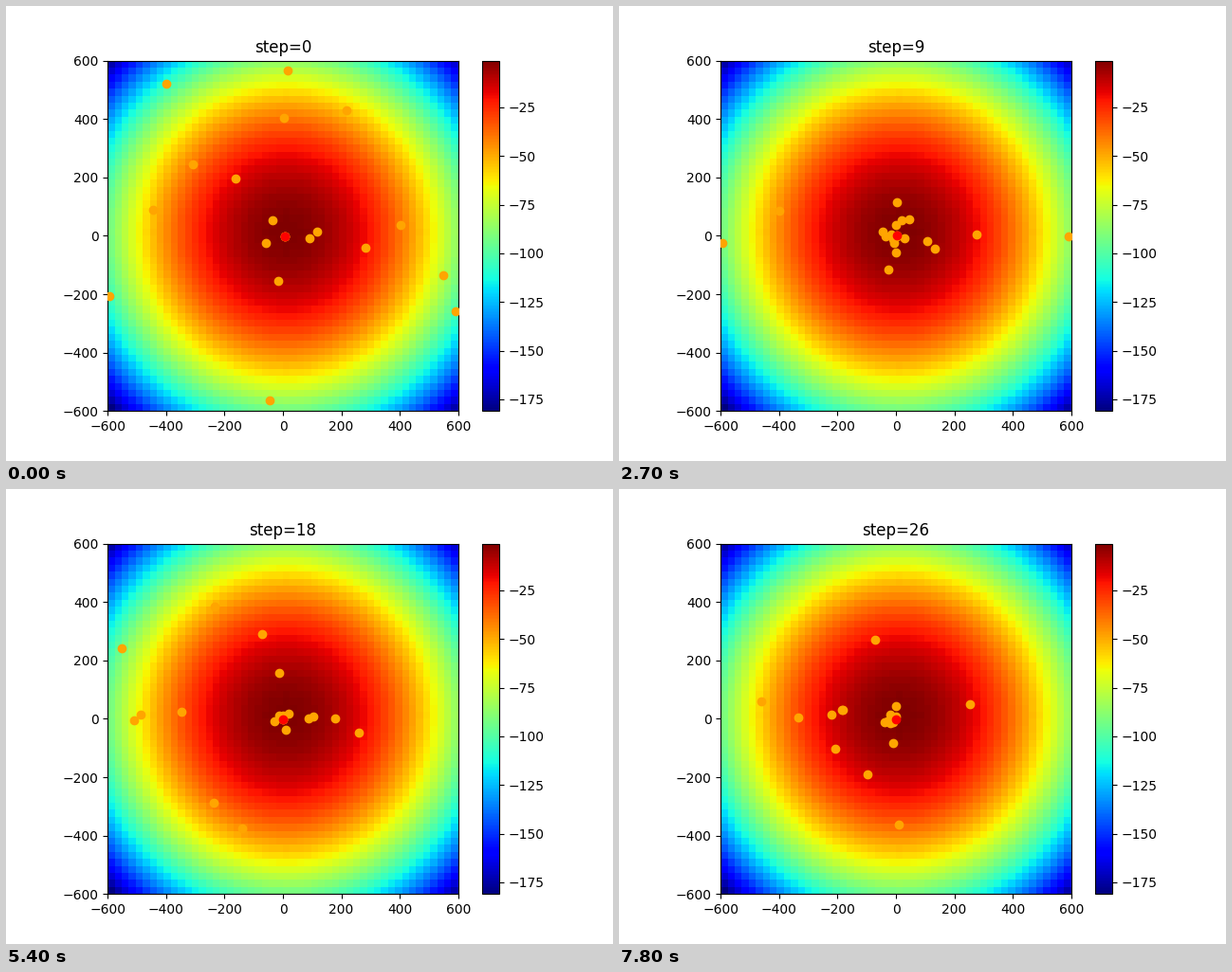
Animation, 640 px wide and 480 px high, one loop 8 s. Source, as a matplotlib script:

```python
import matplotlib.pyplot as plt
import numpy as np
from matplotlib.animation import FuncAnimation

LIMIT = 600
STEPS = 27
STEP_FRAMES = 3
FRAMES = 80

START = [(-398, 522), (16, 566), (3, 403), (216, 430), (-310, 244),
         (-162, 195), (-36, 53), (-58, -26), (117, 13), (91, -10),
         (-16, -155), (283, -42), (403, 36), (549, -136), (591, -260),
         (-594, -205), (-47, -564), (-445, 89), (5, -2), (6, -3)]


def cost(x, y):
    return 1 + (x**2 + y**2) / 4000


def run_colony(seed=7):
    """Artificial bee colony: greedy moves along one axis, then scouting."""
    rng = np.random.default_rng(seed)
    bees = np.array(START, float)
    count = len(bees)
    scout_step = rng.integers(13, 21, count)
    best = min(bees, key=lambda bee: cost(*bee)).copy()
    history = [(bees.copy(), best.copy())]
    for step in range(1, STEPS):
        for i in range(count):
            if step == scout_step[i]:
                bees[i] = rng.uniform((-580, -520), (540, 420))
                continue
            axis = rng.integers(2)
            partner = (i + rng.integers(1, count)) % count
            trial = bees[i].copy()
            trial[axis] += rng.uniform(-1, 1) * (trial - bees[partner])[axis]
            if cost(*trial) < cost(*bees[i]):
                bees[i] = trial
            if cost(*bees[i]) < cost(*best):
                best = bees[i].copy()
        history.append((bees.copy(), best.copy()))
    return history


history = run_colony()

fig = plt.figure(figsize=(6.4, 4.8), dpi=100)
ax = fig.add_subplot()
ax.set_aspect("equal")
edges = np.linspace(-LIMIT, LIMIT, 51)
gx, gy = np.meshgrid(edges, edges)
# Each cell takes the value of its lower left corner.
mesh = ax.pcolormesh(gx, gy, -cost(gx, gy)[:-1, :-1], cmap="jet")
fig.colorbar(mesh, ax=ax, ticks=range(-175, 0, 25))
ax.set(xlim=(-LIMIT, LIMIT), ylim=(-LIMIT, LIMIT))
swarm_dots = ax.scatter([], [], c="orange", zorder=3)
best_dot = ax.scatter([], [], c="red", zorder=4)
title = ax.set_title("step=0")


def update(frame):
    step = frame // STEP_FRAMES
    bees, best = history[step]
    title.set_text(f"step={step}")
    swarm_dots.set_offsets(bees)
    best_dot.set_offsets([best])
    return title, swarm_dots, best_dot


anim = FuncAnimation(fig, update, frames=FRAMES, interval=100, repeat=True,
                     repeat_delay=0)
plt.show()
```
